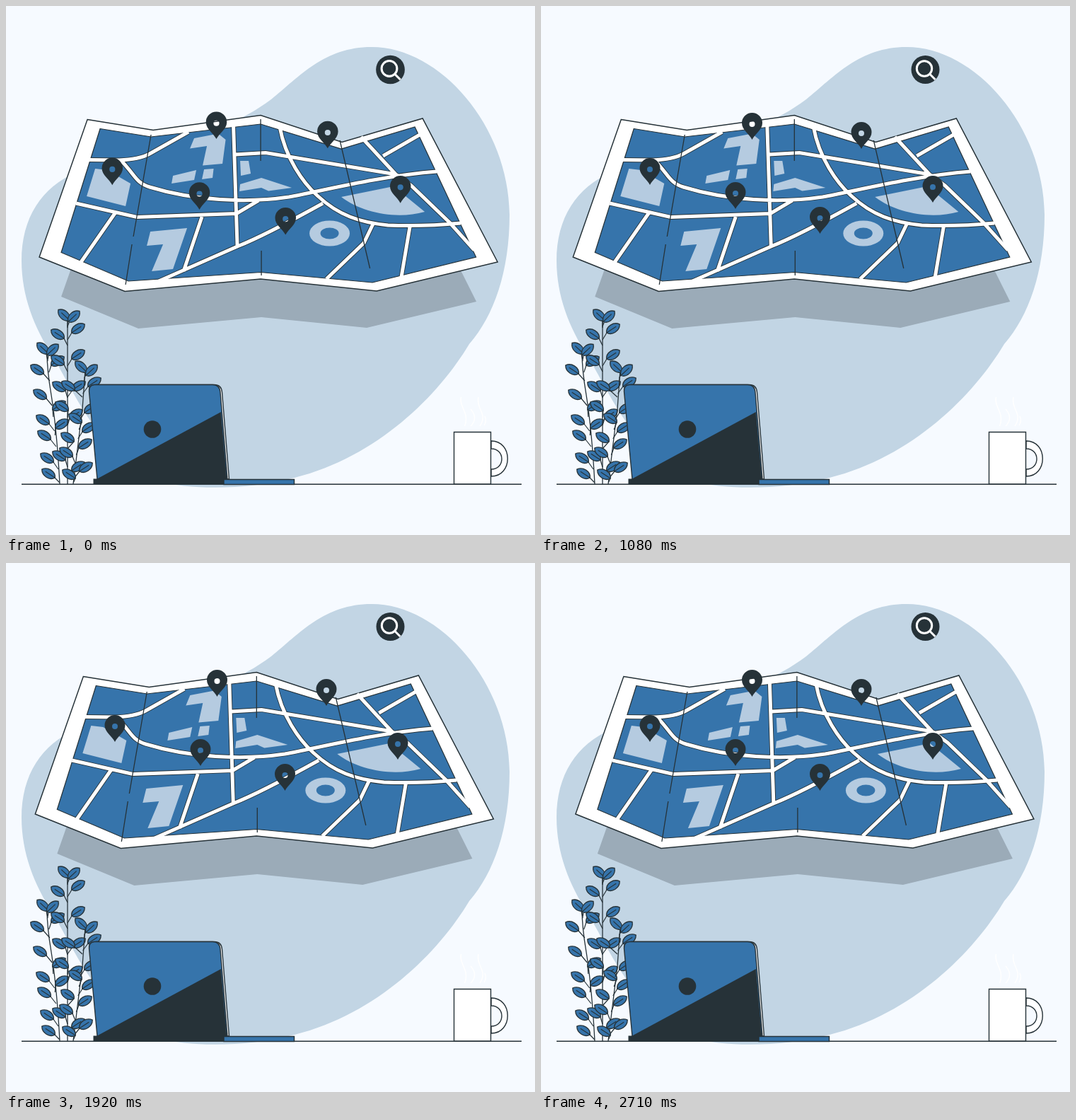
Animation, 748 px wide and 748 px high, one loop 2750 ms. Source, as an HTML page with a canvas:

```html
<!DOCTYPE html>
<html lang="en">
<head>
<meta charset="utf-8">
<title>Map and pins</title>
<style>
  html, body { margin: 0; width: 100%; height: 100%; overflow: hidden; background: #f6faff; }
  canvas { display: block; width: 748px; height: 748px; }
</style>
</head>
<body>
<canvas id="stage" width="748" height="748"></canvas>
<script>
const ctx = document.getElementById('stage').getContext('2d');
const BACK = '#f6faff', BLOB = '#c2d5e4', BLUE = '#3674ab', LIGHT = '#b5cbe0',
      DARK = '#263238', SHADOW = '#9babb8', WHITE = '#fff';

const LOOP = 2750, STEP = 1000 / 24, LAST_STEP = 65;
const CYCLE = 1488, START_PHASE = 0.0185;

// Keyframes as [phase, value], linear in between.
const SHAKE = [[0, 0], [.1, -1], [.2, 2], [.3, -4], [.4, 4], [.5, -4], [.6, 4], [.7, -4], [.8, 2], [.9, -1], [1, 0]];
const BEAT = [[0, 1], [.1, 1.1], [.3, 1], [.4, 1], [.5, 1.1], [.6, 1], [1, 1]];
const SHAKE_UNIT = 1.75;

function keyed(frames, phase) {
  const i = Math.max(1, frames.findIndex(f => f[0] >= phase));
  const [p0, v0] = frames[i - 1], [p1, v1] = frames[i];
  return v0 + (v1 - v0) * (phase - p0) / (p1 - p0);
}

function shape(d, fill, stroke, width = 1.4) {
  const path = d instanceof Path2D ? d : new Path2D(d);
  if (fill) { ctx.fillStyle = fill; ctx.fill(path, 'evenodd'); }
  if (stroke) { ctx.strokeStyle = stroke; ctx.lineWidth = width; ctx.stroke(path); }
}

function ellipse(x, y, rx, ry, fill, stroke, width) {
  const path = new Path2D();
  path.ellipse(x, y, rx, ry, 0, 0, Math.PI * 2);
  shape(path, fill, stroke, width);
}

function scaledAbout(x, y, s, draw) {
  ctx.save();
  ctx.translate(x, y);
  ctx.scale(s, s);
  ctx.translate(-x, -y);
  draw();
  ctx.restore();
}

// ---- background
function drawBlob() {
  shape('M517 58C614 58 711 170 712 295C712 375 690 438 655 478C612 550 525 638 408 667' +
    'C340 685 260 684 215 672C135 640 96 545 66 495C40 455 22 410 22 360' +
    'C22 300 50 256 100 235C200 195 290 195 375 132C415 100 450 58 517 58Z', BLOB);
}

// ---- map
const PAPER = new Path2D('M115 160.5L208 175.5L360 154.5L475 192.5L589 159L695 362L524 403L360 386L168 403.5L47 355Z');
const LAND = new Path2D('M133 173.5L205 185L360 167L474 202L578 171L664.5 355L518 391L360 376.5L173 389L78 348.5Z');
const ROADS = new Path2D([
  'M116 217.5L160 218Q188 217 203 209L258 178',
  'M163 219C182 238 183 250 203 256C265 275 340 279 400 270C440 263 530 240 609 234',
  'M99 279L185 298.5L326 293.5L357 275',
  'M321.5 169L327 340',
  'M324 210L367 207.5L551 238',
  'M387 171C395 215 420 250 440 268C470 296 500 306 540 310Q590 312 643 307',
  'M216 389L327 340Q365 325 448 279',
  'M154 293L106 362', 'M277 298L251 375',
  'M520 306L506 335L453 386', 'M571 312L559 383',
  'M502 185L551 238L573 254L627 306L662 345',
  'M533 212L585 182'
].join(''));
const PLACES = new Path2D(
  'M126 230L143 232L176 251L169 283L114 269Z' +
  'M266 187L300 180.5L310.500 189L306 223L278 225.500L284 198L260 201.500Z' +
  'M236 240L269 232L266 246L234 251Z M280 231L293.500 230L292 243L277 245Z' +
  'M331 219L343 219L346 237L332 240Z' +
  'M331 252L361 243L404 257L371 261.500L361 257L330 262Z' +
  'M204 319L256 314L236 372L206 375L222 337L199 339Z' +
  'M474 270L548 255L592 291C553 302 504 293 474 270Z' +
  'M429 321.500a28.500 18 0 1 0 57 0a28.500 18 0 1 0 -57 0Z' +
  'M444.500 321.500a13 8 0 1 0 26 0a13 8 0 1 0 -26 0Z');
const FOLDS = 'M205 182L180 326M178 337L169 394M360 160L360 219M361 346L361 381M472 190L514.5 371';

function drawMap(dx) {
  ctx.save();
  ctx.translate(dx, 0);
  shape('M91 374L78 411L187 456L361 440L510 455L665 418L643 374Z', SHADOW);
  shape(PAPER, WHITE, DARK, 1.5);
  shape(LAND, BLUE, DARK, 1.2);
  shape(PLACES, LIGHT);
  ctx.save();
  ctx.clip(LAND);
  shape(ROADS, null, DARK, 6.8);
  ctx.restore();
  shape(ROADS, null, WHITE, 5);
  shape(FOLDS, null, DARK, 1.3);
  ctx.restore();
}

// ---- pins and search badge
const PINS = [[154, 230], [275, 264], [394.5, 299], [298.5, 166], [453, 179], [554, 255]];
const PIN = new Path2D('M0 23C-4 15 -14.500 9 -14.500 -0.500A14.500 14.500 0 0 1 14.500 -0.500C14.500 9 4 15 0 23Z' +
  'M-4 1a4 4 0 1 0 8 0a4 4 0 1 0 -8 0Z');

function drawPins(scale) {
  scaledAbout(354, 236.5, scale, () => {
    for (const [x, y] of PINS) {
      ctx.save();
      ctx.translate(x, y);
      shape(PIN, DARK);
      ctx.restore();
    }
  });
}

function drawSearch(scale) {
  scaledAbout(543.5, 90, scale, () => {
    ellipse(543.5, 90, 20, 20, DARK);
    ellipse(542, 88.5, 10.7, 10.7, null, WHITE, 3);
    shape('M549.5 96L557.5 104', null, WHITE, 3);
  });
}

// ---- plant: each stem has leaf centres [x, y, side]
const STEMS = [
  { path: 'M76 676Q72 600 64 550Q58 515 58 490', x: y => 58 + (y - 490) * .097, leaves: [
    [52, 484, -1], [66, 486, 1], [44, 514, -1], [73, 502, 1], [48, 549, -1], [75, 565, 1],
    [52, 585, -1], [79, 591, 1], [54, 607, -1], [58, 639, -1], [60, 661, -1]] },
  { path: 'M87 676L87 440', x: () => 87, leaves: [
    [82, 437, -1], [96, 439, 1], [73, 464, -1], [102, 456, 1], [73, 501, -1], [102, 493, 1],
    [75, 538, -1], [103, 537, 1], [79, 566, -1], [99, 577, 1], [87, 610, -1], [75, 636, -1]] },
  { path: 'M95 676Q103 610 108 570L112 515', x: y => 112 - (y - 515) * .105, leaves: [
    [106, 510, -1], [121, 515, 1], [88, 537, -1], [125, 532, 1], [98, 583, -1], [120, 569, 1],
    [117, 596, 1], [85, 631, -1], [112, 619, 1], [102, 651, 1], [113, 652, 1], [89, 662, -1]] }
];

function drawLeaf(x, y, side, upright) {
  ctx.save();
  ctx.translate(x, y);
  ctx.rotate(side * (upright ? -.75 : -.57));
  ctx.scale(side, 1);
  shape('M-11 0C-7 -8 6 -8 11 0C6 8 -7 8 -11 0Z', BLUE, DARK, 1.3);
  shape('M-11 0L5 0', null, DARK, 1.1);
  ctx.restore();
}

function drawPlant() {
  for (const stem of STEMS) {
    shape(stem.path, null, DARK, 1.3);
    stem.leaves.forEach(([x, y, side], i) => {
      const joint = Math.min(y + 16, 674);
      shape(`M${x - side * 9} ${y + 6}L${stem.x(joint)} ${joint}`, null, DARK, 1.2);
      drawLeaf(x, y, side, i < 2);
    });
  }
}

// ---- desk
function drawLaptop() {
  const lid = 'M129 669L117.500 545Q117 536 125 535.500L292 535.500Q302 535.500 303 546L313 669Z';
  ctx.save();
  ctx.translate(2.5, 0);
  shape(lid, WHITE, DARK);
  ctx.restore();
  shape(lid, BLUE, DARK);
  shape('M128 669L304 574L312.5 672L128 672Z', DARK);
  shape('M123.5 668.5H312V677H123.5Z', DARK);
  shape('M308 669.5H407.5V676.500H308Z', BLUE, DARK);
  ellipse(207, 598.5, 12.3, 12.3, DARK);
}

function drawMug() {
  shape('M686 615C717 615 717 665 686 665L686 655C706 655 706 626 686 626Z', WHITE, DARK);
  shape('M633.5 602.500H685.500V676H633.500Z', WHITE, DARK);
  shape('M643.5 553C640 567 656 575 648.500 594M657 570C664 578 665 586 657 594' +
    'M668 553C664 569 682 577 670 594M677 580Q680 587 676 593', null, WHITE, 1.4);
}

function render(now) {
  const step = Math.min(LAST_STEP, Math.floor((now % LOOP + 5.01) / STEP));
  const phase = (START_PHASE + step * STEP / CYCLE) % 1;
  const scale = keyed(BEAT, phase);

  ctx.fillStyle = BACK;
  ctx.fillRect(0, 0, 748, 748);
  drawBlob();
  shape('M22 676.2H729', null, DARK, 1.4);
  drawPlant();
  drawLaptop();
  drawMug();
  drawMap(keyed(SHAKE, phase) * SHAKE_UNIT + .4);
  drawPins(scale);
  drawSearch(scale);
}

const origin = performance.now();
function tick() {
  render(performance.now() - origin);
  requestAnimationFrame(tick);
}
tick();
</script>
</body>
</html>
```
